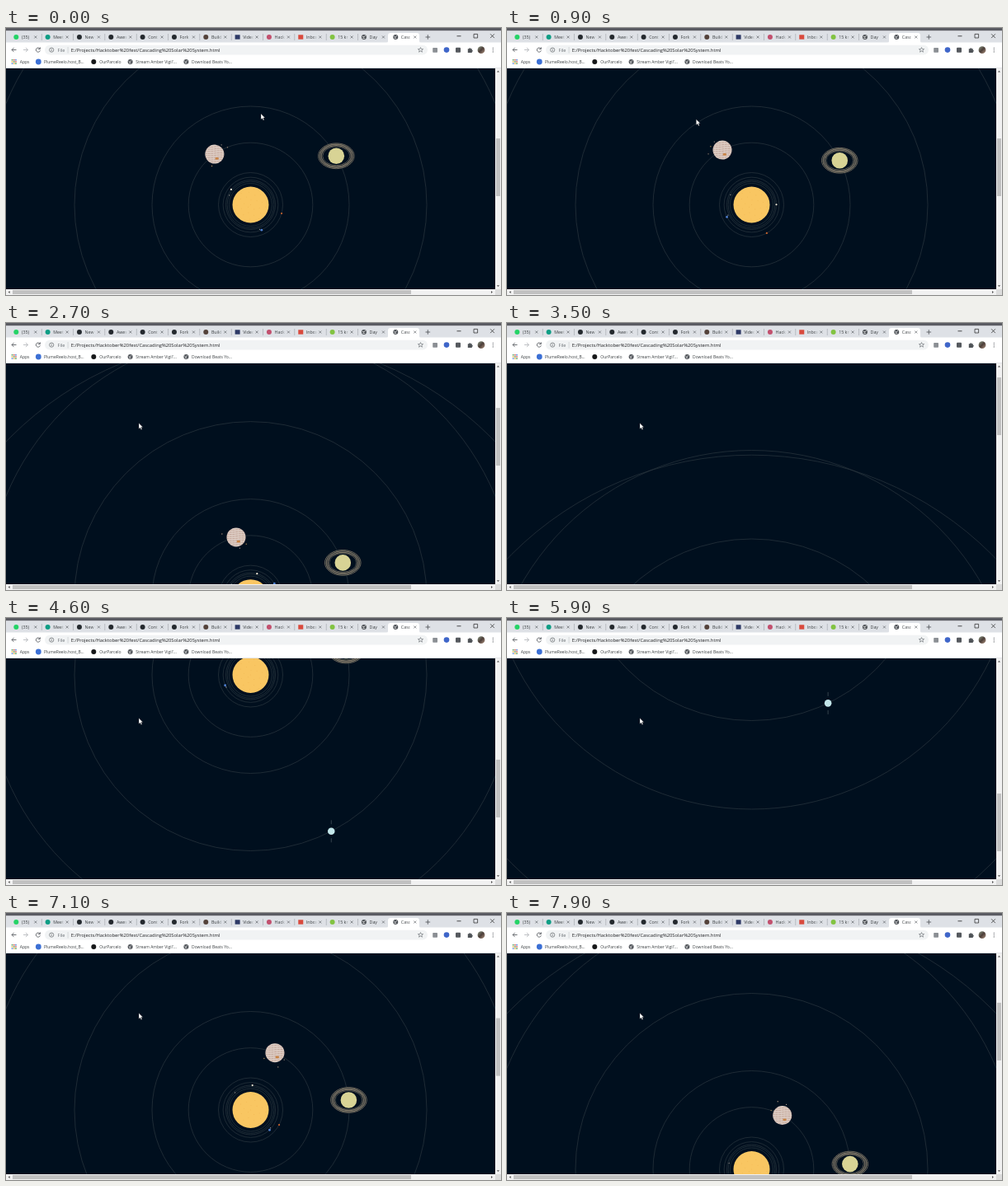
Animation of 600x324 px, one loop 8000 ms. Source, as an HTML page:

```html
<!DOCTYPE html>
<html lang="en">
<head>
<meta charset="utf-8">
<title>Cascading Solar System</title>
<style>
html, body { margin: 0; width: 100%; height: 100%; overflow: hidden; background: #fff; }
svg { display: block; width: 600px; height: 324px; font-family: "Open Sans", "Noto Sans", sans-serif; }
</style>
</head>
<body>
<svg id="stage" viewBox="0 0 600 324"></svg>
<script>
const stage = document.getElementById('stage');

function add(parent, tag, attrs, text) {
  const node = document.createElementNS('http://www.w3.org/2000/svg', tag);
  for (const key in attrs) node.setAttribute(key, attrs[key]);
  if (text) node.textContent = text;
  parent.appendChild(node);
  return node;
}
const rect = (p, x, y, width, height, fill, rx = 0) => add(p, 'rect', { x, y, width, height, fill, rx });
const disc = (p, cx, cy, r, fill) => add(p, 'circle', { cx, cy, r, fill });
const ring = (p, cx, cy, r, stroke, width) =>
  add(p, 'circle', { cx, cy, r, fill: 'none', stroke, 'stroke-width': width });
const line = (p, d, stroke, width = 0.7) =>
  add(p, 'path', { d, fill: 'none', stroke, 'stroke-width': width });
const label = (p, x, y, size, text, fill = '#3c4043') =>
  add(p, 'text', { x, y, 'font-size': size, fill }, text);
const place = (node, x, y) => node.setAttribute('transform', `translate(${x.toFixed(2)} ${y.toFixed(2)})`);

function globe(p, x, y) {
  disc(p, x, y, 3, '#4d5156');
  line(p, `M${x - 2} ${y - 1}q1.2 1.6 2.2 .6t1.6 -1.4M${x - 1.5} ${y + 1.3}h1.8l.8 .8`, '#fff', 0.8);
}
function cross(p, x, y, r, color) {
  line(p, `M${x - r} ${y - r}l${2 * r} ${2 * r}m0 ${-2 * r}l${-2 * r} ${2 * r}`, color);
}

// ---- Space ----
const defs = add(stage, 'defs', {});
const view = add(defs, 'clipPath', { id: 'view' });
rect(view, 0, 49, 593, 268);
const bodyClip = add(defs, 'clipPath', { id: 'ball' });
disc(bodyClip, 0, 0, 11.5);
const photo = add(defs, 'linearGradient', { id: 'photo', x2: 1, y2: 1 });
[['0', '#8c9a86'], ['.5', '#4b3d38'], ['1', '#b79a86']].forEach(([offset, color]) =>
  add(photo, 'stop', { offset, 'stop-color': color }));

const SUN_X = 296.5, START_Y = 214.5;
const space = add(stage, 'g', { 'clip-path': 'url(#view)' });
rect(space, 0, 49, 593, 268, '#000f1e');
const system = add(space, 'g', {});

const ORBIT = '#2c3740';
[26, 28.3, 30, 33.4, 39, 75.3, 119.5, 213.5, 321].forEach(r => ring(system, 0, 0, r, ORBIT, 0.7));
ring(system, 0, 96, 411.3, ORBIT, 0.7);

disc(system, 0, 0, 22, '#f9c662');
for (let i = 0; i < 26; i++) {
  const a = i * 2.4, r = 4 * Math.sqrt(i);
  disc(system, r * Math.cos(a), r * Math.sin(a), 0.45, '#eeb24e');
}

// radius, start angle, degrees per second
const planets = [];
function planet(r, start, speed) {
  const node = add(system, 'g', {});
  planets.push({ node, r, start, speed });
  return node;
}
function moon(parent, r, start, speed, size, color) {
  const node = disc(parent, 0, 0, size, color);
  planets.push({ node, r, start, speed });
}

disc(planet(28.3, 204, 409), 0, 0, 0.7, '#8d8a86');
disc(planet(30, 218.2, 160), 0, 0, 1.1, '#f2ead8');
const earth = planet(33.4, 66.5, 98.6);
disc(earth, 0, 0, 1.4, '#4f7fd0');
moon(earth, 2.6, 200, 520, 0.6, '#b9bcc4');
disc(planet(39, 15.6, 52.4), 0, 0, 1.1, '#c9642c');

const jupiter = planet(75.3, -125.4, 8.23);
disc(jupiter, 0, 0, 11.5, '#ddcdc4');
const bands = add(jupiter, 'g', { 'clip-path': 'url(#ball)' });
for (let y = -9; y < 11; y += 2.6) {
  add(bands, 'path', {
    d: `M-12 ${y}q6 .9 12 0t12 0`, fill: 'none', stroke: '#b08a7c',
    'stroke-width': 0.6, 'stroke-dasharray': '3 .7'
  });
}
add(jupiter, 'ellipse', { cx: 2.8, cy: 5.3, rx: 2.3, ry: 1.4, fill: '#c98445' });
moon(jupiter, 17.6, -28, 217.7, 0.7, '#a8927c');
moon(jupiter, 14.8, 103, 514, 0.7, '#a98a55');
moon(jupiter, 14, -54, 317, 0.6, '#b8a898');

const saturn = planet(119.5, -29.7, 3.37);
add(saturn, 'ellipse', { rx: 22.3, ry: 15.8, fill: '#000f1e' });
[[21.8, 15.4, 0.9], [20, 14, 1.4], [18.1, 12.6, 1.3], [16.5, 11.4, 0.7]].forEach(([rx, ry, w]) =>
  add(saturn, 'ellipse', { rx, ry, fill: 'none', stroke: '#777063', 'stroke-width': w }));
disc(saturn, 0, 0, 9.8, '#d8d395');

const uranus = planet(213.5, 57.4, 1.17);
line(uranus, 'M0 -13.5v5M0 8.5v5', '#4c5a62', 0.7);
disc(uranus, 0, 0, 4.3, '#c2e6ea');

// ---- Browser window ----
const ui = add(stage, 'g', {});
rect(ui, 0, 0, 600, 3.5, '#5a5b62');
rect(ui, 0, 3.5, 600, 14.5, '#dee1e6');
rect(ui, 0, 17.5, 600, 31.5, '#fff');
rect(ui, 0, 48.3, 600, 0.7, '#dadce0');

const PITCH = 38.33;
const tabs = [
  ['(35)', '#25d366'], ['Meet', '#0f9d84'], ['New', '#24292e'], ['Awes', '#24292e'],
  ['Cont', '#24292e'], ['Fork', '#24292e'], ['Build', '#54423a'], ['Video', '#2d3966', 1],
  ['Hack', '#c2506e'], ['Inbox', '#d94a3d', 1], ['15 kr', '#82c341'], ['Day ', null], ['Casc', null]
];
line(ui, 'M461 18q2 0 2 -2v-7q0 -3 3 -3h32q3 0 3 3v7q0 2 2 2z', 'none').setAttribute('fill', '#fff');
tabs.forEach(([title, color, square], i) => {
  const x = 12.3 + i * PITCH, y = 11;
  if (!color) globe(ui, x, y);
  else if (square) rect(ui, x - 3, y - 2.7, 6, 5.4, color);
  else disc(ui, x, y, 3, color);
  const clip = add(defs, 'clipPath', { id: 'tab' + i });
  rect(clip, x + 5, 4, 14, 14);
  label(ui, x + 6.6, 12.9, 5.3, title).setAttribute('clip-path', `url(#tab${i})`);
  rect(ui, x + 16.5, 6, 3, 10, i === 12 ? '#fff' : '#dee1e6').setAttribute('opacity', 0.6);
  cross(ui, x + 23.5, y, 1.5, '#5f6368');
  if (i < 11) rect(ui, x + 30.6, 7, 0.6, 8, '#a0a4aa');
});
line(ui, 'M508.5 11h5.6M511.3 8.2v5.6', '#4a4d51', 0.8);
line(ui, 'M546.5 9.8h5', '#222', 0.8);
line(ui, 'M567 7.4h4.6v4.6h-4.6z', '#222', 0.7);
cross(ui, 589.5, 9.7, 2.4, '#222');

line(ui, 'M12.5 26.5h-5.5m2.6 -2.6l-2.6 2.6l2.6 2.6', '#5f6368', 0.9);
line(ui, 'M21 26.5h5.5m-2.6 -2.6l2.6 2.6l-2.6 2.6', '#b9bcc0', 0.9);
line(ui, 'M41 25a2.6 2.6 0 1 0 .4 2.4M41.4 23.4v2.3h-2.3', '#5f6368', 0.9);
rect(ui, 47, 20.8, 464, 11.6, '#f1f3f4', 5.8);
ring(ui, 55.2, 26.6, 2.6, '#5f6368', 0.7);
line(ui, 'M55.2 26.2v1.8M55.2 24.9v.7', '#5f6368');
label(ui, 62.5, 28.7, 5.6, 'File', '#6b7075');
rect(ui, 74.8, 23, 0.5, 7.5, '#b5b8bc');
label(ui, 78.8, 28.7, 5.84, 'E:/Projects/Hacktober%20fest/Cascading%20Solar%20System.html', '#202124');
line(ui, 'M502.5 23.6l.9 2h2.2l-1.8 1.4l.7 2.2l-2-1.3l-2 1.3l.7-2.2l-1.8-1.4h2.2z', '#5f6368', 0.6);
rect(ui, 517.2, 24, 5.8, 5.8, '#8b8f94', 0.8);
disc(ui, 534, 26.6, 3.3, '#3f66c9');
rect(ui, 545, 23.8, 6, 6, '#55595e', 1);
line(ui, 'M559.8 25.2h1.5a1 1 0 0 1 2 0h1.5v1.6a1 1 0 0 1 0 2v1.2h-5z', 'none').setAttribute('fill', '#4f5357');
disc(ui, 576, 26.7, 4.4, 'url(#photo)');
[24.3, 26.6, 28.9].forEach(y => disc(ui, 590.3, y, 0.65, '#5f6368'));

const DOTS = ['#d9534a', '#4a9a57', '#e0aa3a', '#4b7bd8'];
for (let i = 0; i < 9; i++) rect(ui, 6.8 + (i % 3) * 2.2, 38 + Math.floor(i / 3) * 2.2, 1.5, 1.5, DOTS[(i * 3 + 1) % 4]);
disc(ui, 39.3, 41, 3.4, '#3b6fd4');
disc(ui, 106.3, 41, 3, '#17181a');
globe(ui, 150.6, 41);
globe(ui, 218.4, 41);
[[16.8, 'Apps'], [46, 'PlumeReelo.host_B...'], [113.3, 'OurParcelo'],
 [157.2, "Stream Amber Vigil'..."], [225, 'Download Beats Yo...']
].forEach(([x, text]) => label(ui, x, 42.8, 5, text));

// ---- Scrollbars ----
rect(ui, 593, 49, 7, 268, '#f1f1f1');
rect(ui, 0, 317, 600, 7, '#f1f1f1');
rect(ui, 593, 317, 7, 7, '#dcdcdc');
rect(ui, 8, 318, 483, 5, '#c1c1c1');
const thumb = rect(ui, 594, 0, 5, 70, '#c1c1c1');
const arrow = d => line(ui, d, 'none').setAttribute('fill', '#505050');
arrow('M594.9 53.6h3.2l-1.6 -1.9z');
arrow('M594.9 312.2h3.2l-1.6 1.9z');
arrow('M4.6 318.9v3.2l-1.9 -1.6z');
arrow('M588 318.9v3.2l1.9 -1.6z');

const pointer = add(stage, 'path', {
  d: 'M0 0v7l1.6 -1.5l1.2 2.6l1.1 -.5l-1.1 -2.5h2.1z',
  fill: '#fff', stroke: '#222', 'stroke-width': 0.3
});

// ---- Motion: [seconds, value] ----
const SCROLL = [[0, 214.5], [2200, 214.5], [3300, 475.5], [3600, 475.5], [4600, 69],
  [5400, -89], [5900, -89], [7100, 239], [7900, 311]].map(([ms, v]) => [ms / 1000, v]);
const CLOCK = [[0, 0], [1.9, 1.865], [4.6, 4.575], [7.1, 7.1], [8, 8]];
const POINTER_X = [[0, 309], [0.2, 309], [1.5, 161], [8, 161]];
const POINTER_Y = [[0, 104], [0.2, 104], [1.5, 116.5], [1.9, 116.5], [2.3, 121.5], [8, 121.5]];

function track(steps, t) {
  const i = steps.findIndex(step => step[0] > t);
  if (i < 0) return steps[steps.length - 1][1];
  const [t0, a] = steps[i - 1], [t1, b] = steps[i];
  return a + (b - a) * (t - t0) / (t1 - t0);
}

function draw(t) {
  const sunY = track(SCROLL, t), clock = track(CLOCK, t);
  place(system, SUN_X, sunY);
  for (const { node, r, start, speed } of planets) {
    const a = (start + speed * clock) * Math.PI / 180;
    place(node, r * Math.cos(a), r * Math.sin(a));
  }
  thumb.setAttribute('y', 134 + (START_Y - sunY) / 3.84);
  place(pointer, track(POINTER_X, t), track(POINTER_Y, t));
}

function tick() {
  const ms = performance.now() % 8000;
  draw(Math.floor(ms / 100 + 0.1) % 80 / 10);
  requestAnimationFrame(tick);
}
tick();
</script>
</body>
</html>
```
